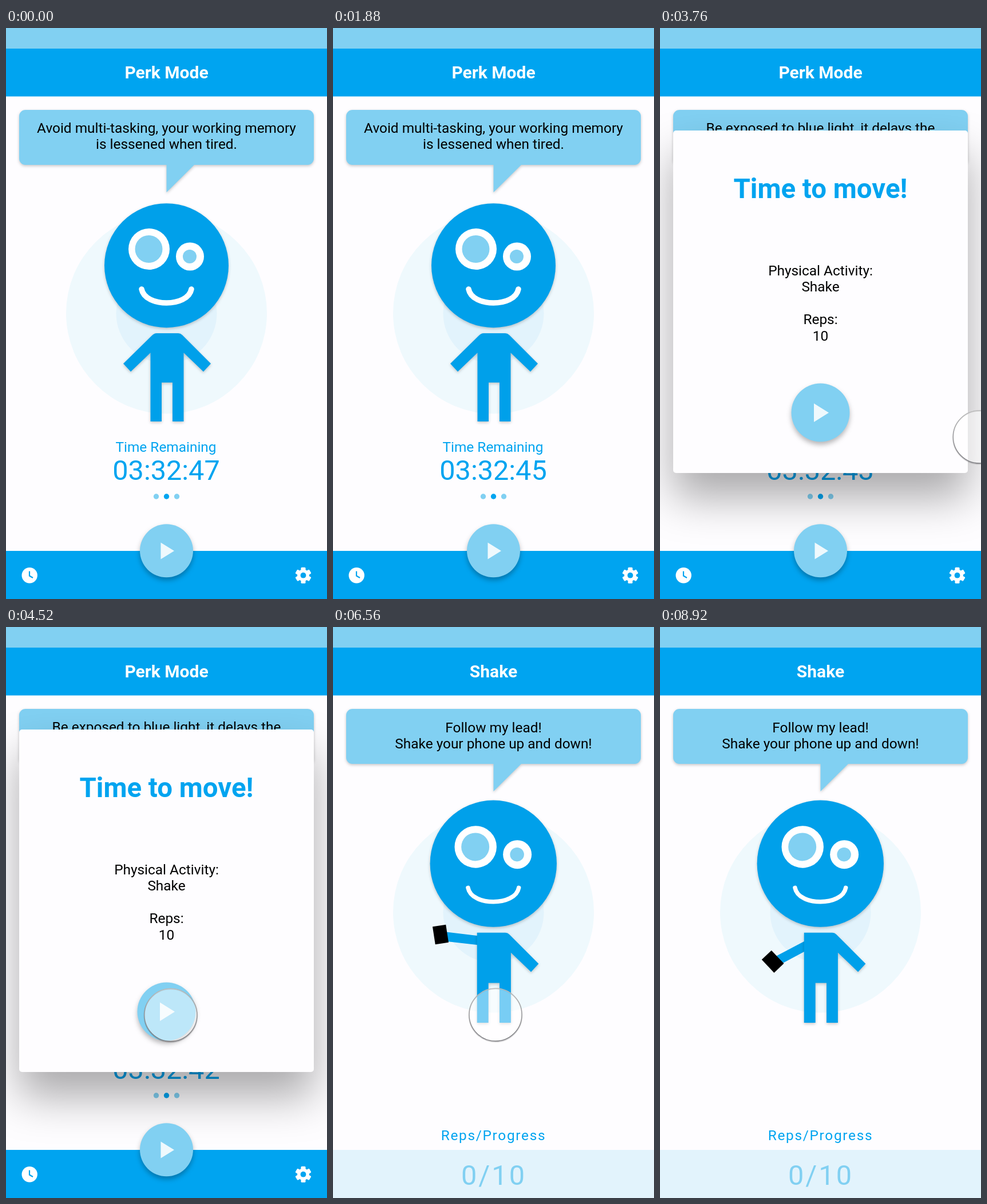
Animation, 561 px wide and 997 px high, one loop 8960 ms. Source, as an HTML page:

```html
<!DOCTYPE html>
<html lang="en">
<head>
<meta charset="utf-8">
<title>Perk Mode</title>
<style>
  html, body { margin: 0; width: 100%; height: 100%; overflow: hidden; background: #fefdff; }
  svg { display: block; width: 100%; height: 100%; }
  text { font: 24.4px Roboto, "Noto Sans", sans-serif; text-anchor: middle; }
  .title { font-size: 30px; font-weight: 700; fill: #fff; }
  .alert { font-size: 47.4px; font-weight: 700; }
  .big { font-size: 48.6px; }
  .blue { fill: #00a4f0; }
  .light { fill: #81d0f2; }
  .pale { fill: #e2f3fc; }
  .body { fill: #00a0ea; }
  .lift { filter: drop-shadow(0 2px 2.5px rgba(0, 0, 0, .22)); }
  .float { filter: drop-shadow(0 5px 4px rgba(0, 0, 0, .28)); }
  .sheet { filter: drop-shadow(0 43px 37px rgba(0, 0, 0, .33)); }
</style>
</head>
<body>
<svg viewBox="0 0 561 997" preserveAspectRatio="none">
  <defs>
    <linearGradient id="rim" x1="0" y1="0" x2="0" y2="1">
      <stop offset="0" stop-color="#bbb"/>
      <stop offset="1" stop-color="#77777c"/>
    </linearGradient>
    <g id="eyes">
      <g fill="#fff"><circle cx="250" cy="386" r="36"/><circle cx="321.5" cy="399" r="24.5"/></g>
      <g class="light"><circle cx="249.5" cy="386" r="24"/><circle cx="321" cy="399" r="12"/></g>
    </g>
    <g id="head">
      <circle class="body lift" cx="280.5" cy="414.7" r="108.5"/>
      <use href="#eyes"/>
      <path d="M237 456C243 488 318 488 324 456" fill="none" stroke="#fff" stroke-linecap="round"/>
    </g>
  </defs>

  <rect width="561" height="997" fill="#fefdff"/>
  <circle cx="280.5" cy="498" r="175.5" fill="#eff9fd"/>
  <circle class="pale" cx="280.5" cy="498" r="88"/>
  <path class="light lift" d="M34 143H527a11 11 0 0 1 11 11V228a11 11 0 0 1 -11 11H329L280.5 287V239H34a11 11 0 0 1 -11 -11V154a11 11 0 0 1 11 -11Z"/>

  <g id="home">
    <text x="280.5" y="182.5" id="tipTop"></text>
    <text x="280.5" y="211" id="tipEnd"></text>
    <path class="body lift" d="M205 586L255 537Q259 533 263 533H301Q305 533 308 536L358 586L345 600L310.5 567V687H291V619H272V687H252.5V567L218 600Z"/>
    <use href="#head" stroke-width="9.5"/>
    <text class="blue" x="279.5" y="740">Time Remaining</text>
    <text class="blue big" x="280" y="788.5" id="clock"></text>
    <circle class="light" cx="262.5" cy="818" r="4.7"/>
    <circle class="blue" cx="280.5" cy="818" r="4.7"/>
    <circle class="light" cx="298.5" cy="818" r="4.7"/>

    <g id="modal">
      <rect class="sheet" x="23" y="179" width="515" height="598" rx="5" fill="#fefdff"/>
      <text class="blue alert" x="280.5" y="297">Time to move!</text>
      <text x="280.5" y="431.5">Physical Activity:</text>
      <text x="280.5" y="460">Shake</text>
      <text x="280.5" y="517">Reps:</text>
      <text x="280.5" y="545.5">10</text>
      <circle class="light float" cx="280.5" cy="671.5" r="51"/>
      <path d="M269 655.5V688L295 671.8Z" fill="#eff9fd"/>
    </g>

    <rect class="blue" y="913" width="561" height="84"/>
    <circle class="light float" cx="280.5" cy="912.8" r="46.5"/>
    <path d="M270.5 898.5V927.5L294 913Z" fill="#eff9fd"/>
    <circle cx="41.2" cy="955.7" r="13.7" fill="#fff"/>
    <path d="M41 948.5V956.5L47 960" fill="none" stroke="#00a4f0" stroke-width="2.2"/>
    <g id="gear" transform="translate(519.5 955.7)" fill="#fff">
      <circle r="10.5"/>
      <rect id="cog" x="-4" y="-14" width="8" height="28" rx="1.5"/>
      <use href="#cog" transform="rotate(60)"/>
      <use href="#cog" transform="rotate(120)"/>
      <circle class="blue" r="4.9"/>
    </g>
  </g>

  <g id="exercise">
    <text x="280.5" y="183.7">Follow my lead!</text>
    <text x="280.5" y="212.3">Shake your phone up and down!</text>
    <g id="buddy">
      <g id="arm">
        <path class="body" d="M199 528L268 541V557L199 544.5Z"/>
        <rect x="177" y="516" width="23.5" height="31.5" transform="rotate(-5 188.7 531.7)"/>
      </g>
      <g transform="matrix(1.02 0 0 1.02 -5.8 -9.8)">
        <path class="body lift" d="M252.5 533H301Q305 533 308 536L358 586L345 600L310.5 567V687H291V619H272V687H252.5Z"/>
        <use href="#head" stroke-width="7.3"/>
      </g>
    </g>
    <text class="blue" x="280.5" y="896" letter-spacing="1.7">Reps/Progress</text>
    <rect class="pale" y="913" width="561" height="84"/>
    <text class="light big" x="281" y="973.5" letter-spacing="3">0/10</text>
  </g>

  <rect class="light" width="561" height="36"/>
  <rect class="blue" y="36" width="561" height="83.5"/>
  <text class="title" x="280.5" y="88" id="title"></text>

  <g id="touch">
    <circle cy="1" r="46.3" fill="none" stroke="#000" stroke-opacity=".16" stroke-width="2"/>
    <circle r="46" fill="#fff" fill-opacity=".47" stroke="url(#rim)" stroke-width="1.4"/>
  </g>
</svg>
<script>
  const LOOP = 8960;
  const MODAL_AT = 2320, EXERCISE_AT = 5600, BUDDY_AT = 5920;
  const $ = id => document.getElementById(id);
  const show = (id, on) => $(id).setAttribute('display', on ? 'inline' : 'none');
  const progress = (t, start, length) => Math.min(1, Math.max(0, (t - start) / length));
  const easeInOut = u => u < .5 ? 4 * u ** 3 : 1 - 4 * (1 - u) ** 3;
  const easeOut = u => 1 - (1 - u) ** 3;

  function drawHome(t) {
    const open = t >= MODAL_AT;
    $('tipTop').textContent = open ? 'Be exposed to blue light, it delays the'
                                   : 'Avoid multi-tasking, your working memory';
    $('tipEnd').textContent = open ? 'production of melatonin.' : 'is lessened when tired.';
    $('clock').textContent = '03:32:' + (47 - Math.floor((t + 600) / 1000));

    const entry = easeOut(progress(t, MODAL_AT, 280));
    show('modal', open);
    $('modal').setAttribute('opacity', entry);
    $('modal').setAttribute('transform', `translate(0 ${62 * (1 - entry)})`);
  }

  function drawExercise(t) {
    show('buddy', t >= BUDDY_AT);
    const swing = (1 - Math.cos((t - 7560) / 907 * 2 * Math.PI)) / 2;
    $('arm').setAttribute('transform', `rotate(${-38.5 * swing} 268 546)`);
  }

  function drawTouch(t) {
    const enter = easeInOut(progress(t, 3144, 1600));
    const leave = easeInOut(progress(t, 7560, 800));
    const x = 640 - 356 * enter - 374 * leave;
    const y = 725 - 48 * enter + 40 * leave;
    $('touch').setAttribute('transform', `translate(${x} ${y})`);
  }

  function draw(t) {
    const exercising = t >= EXERCISE_AT;
    show('home', !exercising);
    show('exercise', exercising);
    $('title').textContent = exercising ? 'Shake' : 'Perk Mode';
    if (exercising) drawExercise(t); else drawHome(t);
    drawTouch(t);
  }

  const begin = performance.now();
  function tick() {
    draw((performance.now() - begin) % LOOP);
    requestAnimationFrame(tick);
  }
  tick();
</script>
</body>
</html>
```
